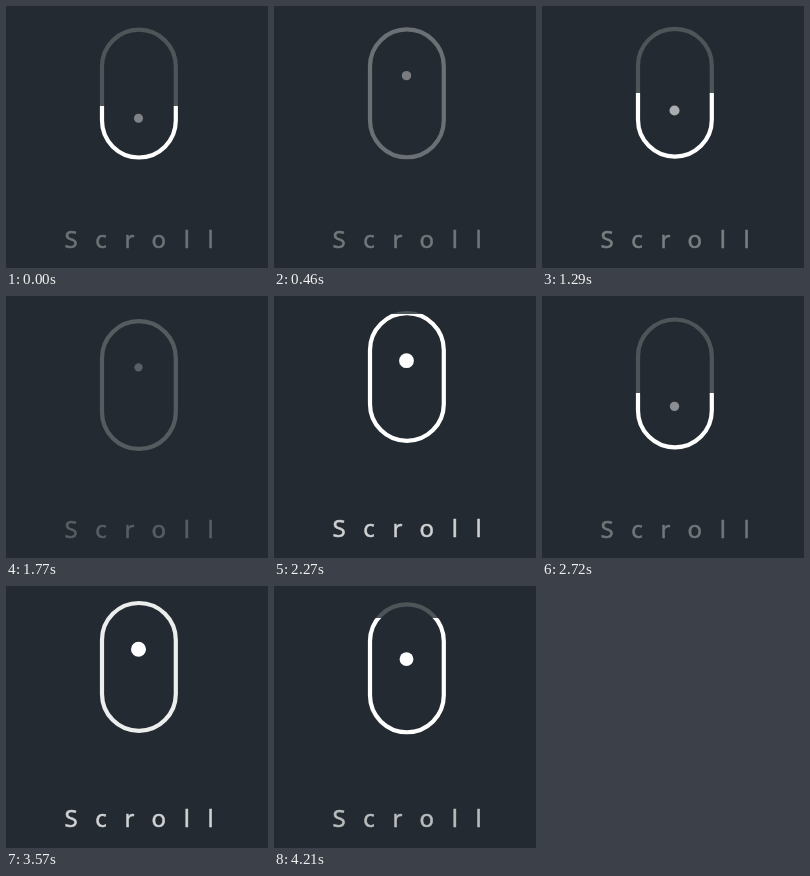
Write an HTML page that moves like this. It is 262x262 px and loops after 4260 ms.

```html
<!DOCTYPE html>
<html lang="en">
<head>
<meta charset="utf-8">
<title>Scroll hint</title>
<style>
  html, body { margin: 0; width: 100%; height: 100%; overflow: hidden; background: #242a31; }
  svg { display: block; width: 100%; height: 100%; }
  text { font: 24px "Noto Sans", "Open Sans", sans-serif; letter-spacing: 17.6px; stroke-width: .5px; }
</style>
</head>
<body>
<svg viewBox="0 0 262 262">
  <defs>
    <linearGradient id="fill" gradientUnits="userSpaceOnUse" x1="0" y1="15" x2="0" y2="147">
      <stop class="edge" id="upper"/>
      <stop class="edge" stop-color="#fff"/>
    </linearGradient>
  </defs>
  <g id="mouse">
    <rect x="96" y="16.8" width="73.8" height="127.8" rx="36.9" fill="none" stroke="url(#fill)" stroke-width="4.2"/>
    <circle id="ball" cx="132.5" fill="#fff"/>
  </g>
  <text id="label" x="58.6" y="240.6">Scroll</text>
</svg>
<script>
// All times in ms. A stroke drains the white outline, then glows back to white.
const LOOP = 4260, LEAD = 485;
const DRAIN = 865, GLOW = 505, STROKE = DRAIN + GLOW;
const STROKES = 3, REST = 490;
const REBORN = 770, GROWTH = 460;   // the ball returns while the outline is still grey
const GREY = [78, 85, 89];

const $ = id => document.getElementById(id);
const edges = document.querySelectorAll('.edge');
const clamp = v => Math.min(1, Math.max(0, v));
const easeOut = x => 1 - (1 - x) ** 1.75;
const shade = white => `rgb(${GREY.map(c => Math.round(c + (255 - c) * white))})`;

function set(id, attributes) {
  for (const name in attributes) $(id).setAttribute(name, attributes[name]);
}

// Time since the current stroke began; 0 while resting.
function strokeTime(now) {
  const clock = now % LOOP + LEAD;
  const busy = STROKES * STROKE;
  return clock < busy ? clock % STROKE : Math.max(0, clock - busy - REST);
}

function ballAt(s, drain) {
  if (s < REBORN) return { y: 75.5 * drain, scale: 1 - .7 * drain, opacity: clamp(1.6 - 2.1 * drain) };
  const grown = clamp((s - REBORN) / GROWTH);
  return { y: 0, scale: .4 + .6 * grown, opacity: grown };
}

function draw(now) {
  const s = strokeTime(now);
  const drain = clamp(s / DRAIN), glow = clamp((s - DRAIN) / GLOW);
  const swing = easeOut(drain) - easeOut(glow);
  const ball = ballAt(s, drain);

  edges.forEach(stop => stop.setAttribute('offset', clamp(1.06 * drain)));
  set('upper', { 'stop-color': shade(glow) });
  set('mouse', { transform: `translate(0 ${9 * swing})` });
  set('ball', { cy: 63 + ball.y, r: 7.5 * ball.scale, opacity: ball.opacity });

  const ink = shade(.75 * (1 - swing));
  set('label', { transform: `translate(0 ${2 * swing})`, fill: ink, stroke: ink });
}

const start = performance.now();
function tick() {
  draw(performance.now() - start);
  requestAnimationFrame(tick);
}
tick();
</script>
</body>
</html>
```
